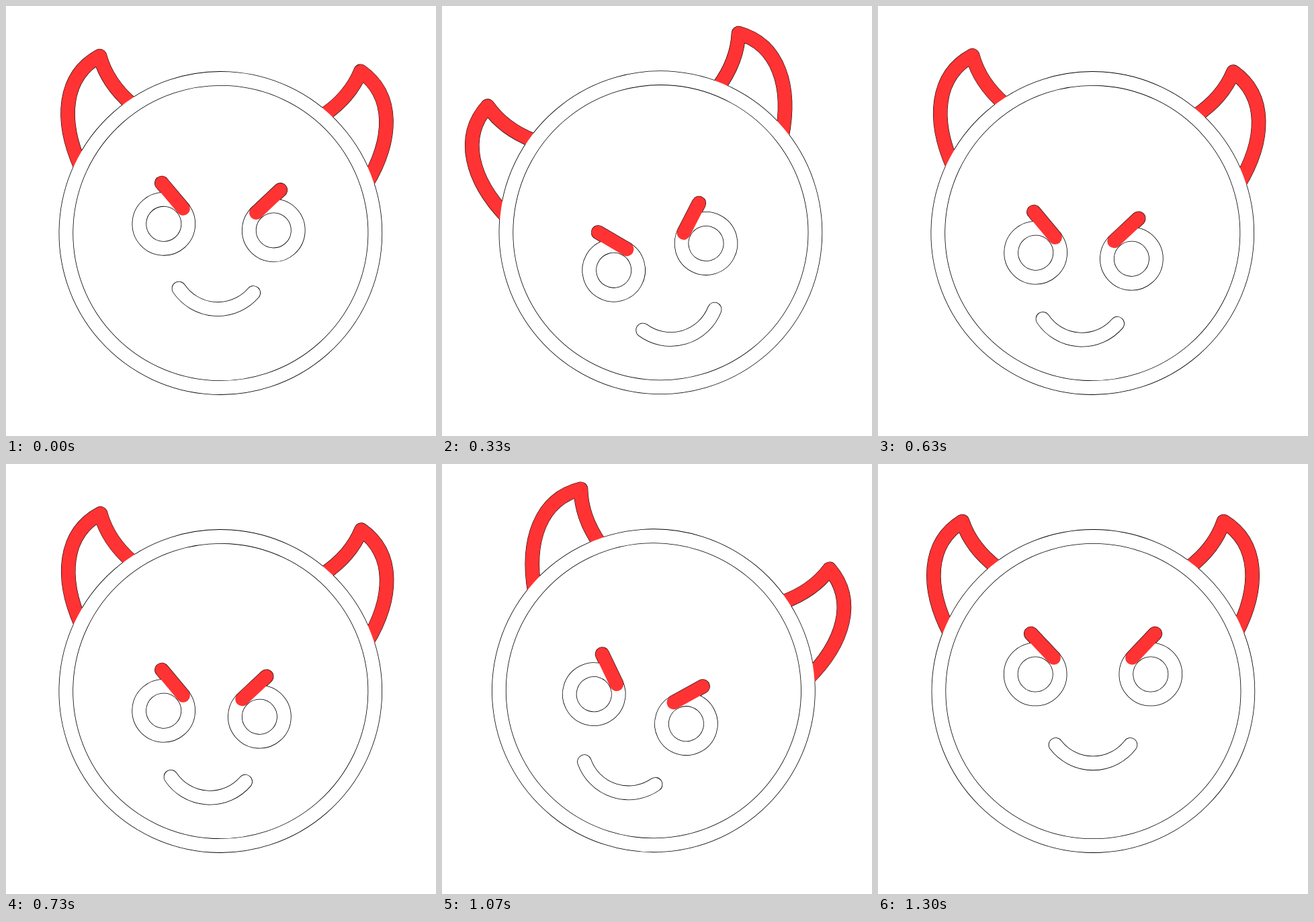
Animation, 640 px wide and 640 px high, one loop 1.67 s. Source, as an HTML page with a canvas:

```html
<!DOCTYPE html>
<html lang="en">
<head>
<meta charset="utf-8">
<title>Little devil shaking its head</title>
<style>
  html, body { margin: 0; height: 100%; overflow: hidden; background: #fff; }
  canvas { display: block; }
</style>
</head>
<body>
<canvas id="stage" width="640" height="640"></canvas>
<script>
const ctx = document.getElementById('stage').getContext('2d');
const LOOP = 1670, STEP = 33.3;
const WHITE = '#fff', RED = '#ff3333', BLACK = '#000';

// Keys are [step, value]; every stretch eases in and out.
const ANGLE = [[-1.35, 0], [6.1, 38.6], [10.5, -18.2], [14.5, 3.6],
               [22, 3.6], [27.8, -18.2], [32, 17.8], [38, 0]];
const EYES = [[-1.55, 0], [2.95, 1], [31.2, 1], [38, 0]];
const MOUTH = [[-0.95, 0], [3.55, 1], [32, 1], [39, 0]];

// All shapes are placed relative to the pivot at the stage centre.
const horn = new Path2D('M-213-68C-248.5-136-247-202-194.5-234.5Q-181-195-143-166');
const head = new Path2D('M230.4 18A230 230 0 1 1-229.6 18A230 230 0 1 1 230.4 18Z');
const eye = new Path2D('M36.5 0A36.5 36.5 0 1 1-36.5 0A36.5 36.5 0 1 1 36.5 0Z');
const brow = new Path2D('M-6.5-60.5L27.5-24.5');
const mouth = new Path2D('M-55.5 98A70 70 0 0 0 55.5 98');

const mix = (a, b, p) => a + (b - a) * p;

function valueAt(keys, n) {
  const i = keys.findIndex(key => key[0] > n);
  if (i < 0) return keys[keys.length - 1][1];
  if (i === 0) return keys[0][1];
  const [n0, a] = keys[i - 1], [n1, b] = keys[i];
  const p = (n - n0) / (n1 - n0);
  return mix(a, b, p * p * (3 - 2 * p));
}

function stroke({ path, color, x = 0, y = 0, flip = 1, cap = 'round' }, outline) {
  ctx.save();
  ctx.translate(x, y);
  ctx.scale(flip, 1);
  ctx.lineCap = cap;
  ctx.lineWidth = outline ? 21.6 : color === RED ? 20.5 : 20;
  ctx.strokeStyle = outline ? BLACK : color;
  ctx.stroke(path);
  ctx.restore();
}

// One thin outline runs around all parts of a group together.
function group(...parts) {
  parts.forEach(part => stroke(part, true));
  parts.forEach(part => stroke(part, false));
}

function draw(n) {
  const look = valueAt(EYES, n), smile = valueAt(MOUTH, n);
  ctx.setTransform(1, 0, 0, 1, 0, 0);
  ctx.fillStyle = WHITE;
  ctx.fillRect(0, 0, 640, 640);
  ctx.translate(320, 320);
  ctx.rotate(valueAt(ANGLE, n) * Math.PI / 180);
  ctx.lineJoin = 'round';

  group(
    { path: horn, color: RED, cap: 'butt' },
    { path: horn, color: RED, cap: 'butt', flip: -1 },
    { path: head, color: WHITE }
  );
  for (const flip of [1, -1]) {
    const x = mix(0, -10.7, look) - flip * mix(85.8, 71.5, look);
    const y = mix(-7, 52.5, look);
    group({ path: eye, color: WHITE, x, y }, { path: brow, color: RED, x, y, flip });
  }
  group({ path: mouth, color: WHITE, x: -9.8 * smile, y: 52.2 * smile });
}

function tick() {
  draw(Math.floor((performance.now() % LOOP + 4) / STEP));
  requestAnimationFrame(tick);
}
tick();
</script>
</body>
</html>
```
